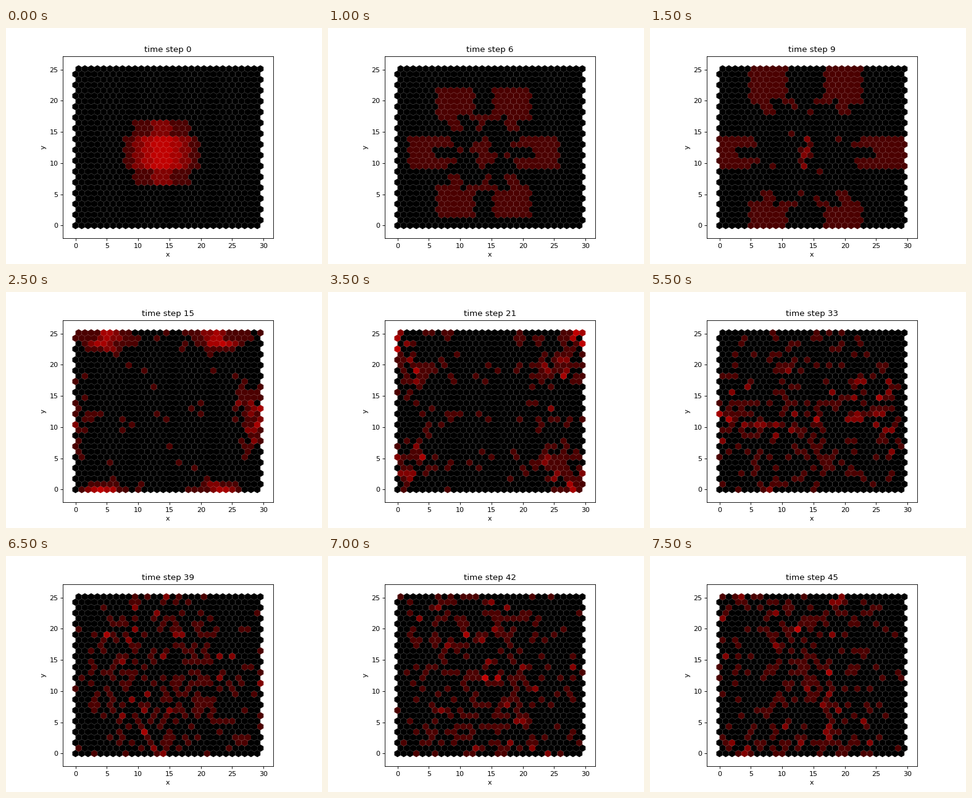
These frames come from a looping animation (512 px wide and 384 px high, 8 s). A matplotlib script:

```python
import numpy as np
import matplotlib.pyplot as plt
from matplotlib.animation import FuncAnimation
from matplotlib.collections import PolyCollection

# Lattice gas (FHP with rest particles) on a periodic hexagonal grid
SIZE = 30
STRIDE = 3
FRAMES = 16
REST = 64
# Bits 0..5: right, up-right, up-left, left, down-left, down-right
MOVES = [(1, 0), (1, 1), (-1, 1), (-1, 0), (-1, -1), (1, -1)]


def collision_table():
    table = np.tile(np.arange(128), (2, 1))
    for i in range(6):
        one = 1 << i
        pair = 1 << (i + 1) % 6 | 1 << (i - 1) % 6
        table[:, REST | one] = pair
        table[:, pair] = REST | one
    for rest in (0, REST):
        for i in range(3):
            for k in (0, 1):
                table[k, 9 << i | rest] = 9 << (i + 1 + k) % 3 | rest
        table[:, 21 | rest] = 42 | rest
        table[:, 42 | rest] = 21 | rest
    return table


def shift(plane, dx, dy):
    if dy == 0:
        return np.roll(plane, dx, axis=1)
    out = plane.copy()
    first = 1 if dx > 0 else 0
    out[first::2] = np.roll(plane[first::2], dx, axis=1)
    return np.roll(out, dy, axis=0)


def propagate(cells):
    out = cells & REST
    for i, (dx, dy) in enumerate(MOVES):
        out = out | shift(cells >> i & 1, dx, dy) << i
    return out


def simulate():
    rng = np.random.default_rng(4)
    table = collision_table()
    cells = np.zeros((SIZE, SIZE), dtype=int)
    cells[11:17, 11:17] = 127
    history = []
    for _ in range(FRAMES):
        for _ in range(STRIDE):
            cells = propagate(cells)
            cells = table[rng.integers(0, 2, cells.shape), cells]
        history.append(sum(cells >> i & 1 for i in range(7)).ravel())
    return history


def shades(count):
    colors = np.zeros((count.size, 3))
    colors[:, 0] = 1 - np.exp(-0.35 * count)
    return colors


history = simulate()

row, col = np.mgrid[:SIZE, :SIZE]
x = (col + 0.5 * (row % 2)).ravel()
y = (row * np.sqrt(3) / 2).ravel()
angle = np.pi / 2 + np.arange(6) * np.pi / 3
corners = np.column_stack([np.cos(angle), np.sin(angle)]) / np.sqrt(3)
hexagons = np.column_stack([x, y])[:, None, :] + corners

fig, ax = plt.subplots(figsize=(6.4, 4.8), dpi=80)
grid = PolyCollection(hexagons, facecolors=shades(history[0]),
                      edgecolors="none", linewidths=0)
ax.add_collection(grid)
ax.set_aspect("equal")
ax.set_xlim(x.min() - 2, x.max() + 2)
ax.set_ylim(y.min() - 2, y.max() + 2)
ax.set_xlabel("x")
ax.set_ylabel("y")
title = ax.set_title("time step 0")


def update(i):
    grid.set_facecolor(shades(history[i]))
    title.set_text(f"time step {i * STRIDE}")
    return grid, title


anim = FuncAnimation(fig, update, frames=FRAMES, interval=500,
                     repeat=True, repeat_delay=0, blit=False)
plt.show()
```
